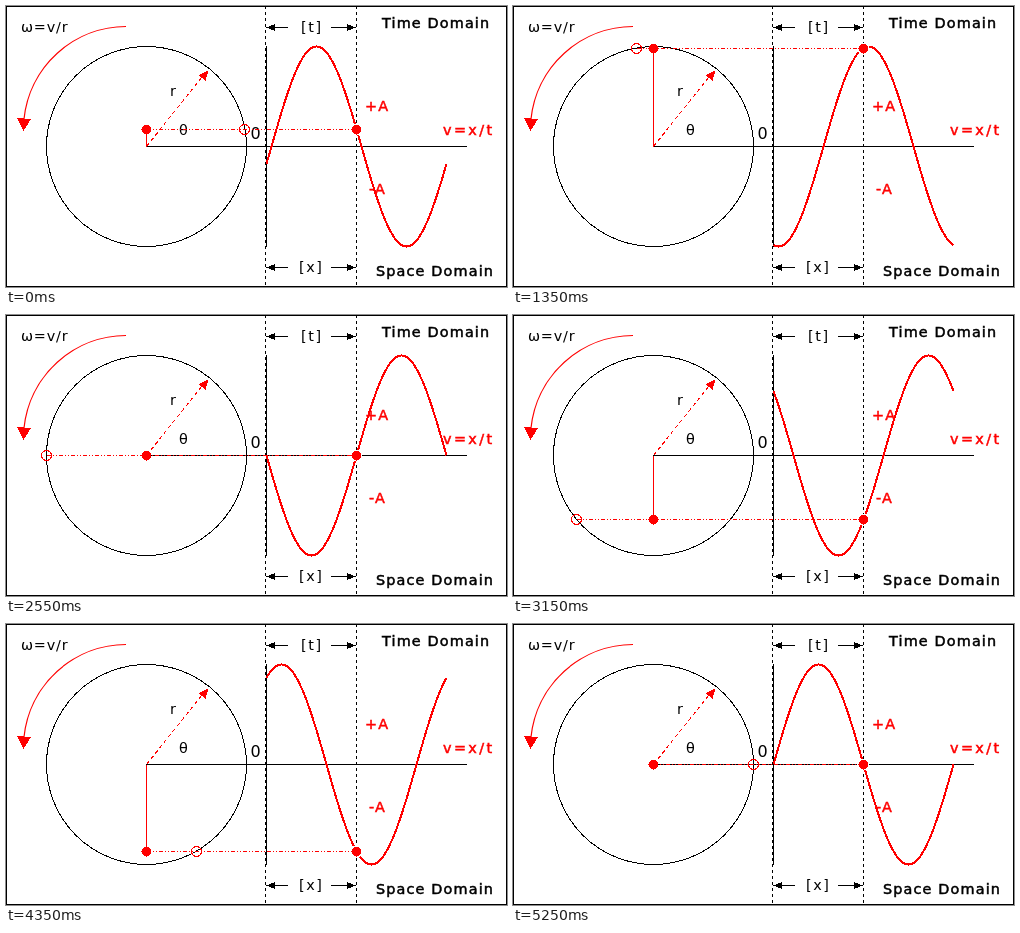
These frames come from a looping animation (501 by 281 pixels, 5.4 s). An HTML page:

```html
<!DOCTYPE html>
<html lang="en">
<head>
<meta charset="utf-8">
<title>Rotation and sine wave</title>
<style>
html, body { margin: 0; width: 100%; height: 100%; overflow: hidden; background: #fff; }
svg { display: block; width: 501px; height: 281px; shape-rendering: crispEdges; fill: none; stroke: #000; }
text { font: 14.4px "DejaVu Sans", Verdana, sans-serif; fill: #000; stroke: none; }
.red { stroke: #f00; }
text.red { fill: #f00; stroke: none; }
text.heavy { stroke: #000; stroke-width: .5; letter-spacing: 1.15px; }
text.red.heavy { stroke: #f00; }
.head { fill: #000; stroke: none; }
.red.head { fill: #f00; stroke: none; }
.dot { fill: #f00; stroke: #f00; }
.halo { fill: #fff; stroke: none; }
.smooth { shape-rendering: geometricPrecision; stroke-width: 1.2; }
</style>
</head>
<body>
<svg viewBox="0 0 501 281">
  <rect x=".5" y=".5" width="500" height="280"/>
  <circle cx="140.5" cy="140.5" r="100"/>
  <path d="M140 140.5H461M260.5 40V241"/>
  <path d="M259.5 0V281M350.5 0V281" stroke-dasharray="3 3"/>

  <g id="span">
    <path d="M268 21.5H282M325 21.5H341"/>
    <path class="head" d="M260 21.5l9-3.5v7zM350 21.5l-9-3.5v7z"/>
  </g>
  <use href="#span" y="240"/>

  <path class="red smooth" d="M120 20.5A103 103 0 0 0 18 113"/>
  <path class="red head" d="M17.5 125L11 112l14 1z"/>
  <path class="red" d="M140.5 140.5L196 71" stroke-dasharray="4 3"/>
  <path class="red head" d="M202.5 64l-3 11-7-6z"/>

  <text x="15" y="26" letter-spacing=".8">ω=v/r</text>
  <text x="164" y="90">r</text>
  <text x="173" y="129">θ</text>
  <text x="244.5" y="133" style="font-size:16px">0</text>
  <text x="295" y="26" letter-spacing="1.6">[t]</text>
  <text x="293" y="266" letter-spacing="1.6">[x]</text>
  <text class="heavy" x="376" y="22">Time Domain</text>
  <text class="heavy" x="370" y="270">Space Domain</text>
  <text class="red heavy" x="359" y="105">+A</text>
  <text class="red heavy" x="363" y="188">-A</text>
  <text class="red heavy" x="437" y="129" style="letter-spacing:2.4px">v=x/t</text>

  <path id="wave" class="red" stroke-width="2"/>
  <circle id="halo" class="halo" cx="350.5" r="6"/>
  <path id="link" class="red" stroke-dasharray="4 2 1 2 1 2"/>
  <path id="height" class="red"/>
  <circle id="rim" class="red" r="5"/>
  <circle id="axisDot" class="dot" cx="140.5" r="4.5"/>
  <circle id="waveDot" class="dot" cx="350.5" r="4.5"/>
</svg>
<script>
const STEP = 150, STEPS = 36, R = 100, MID = 140.5;
const el = id => document.getElementById(id);
const set = (id, attrs) => {
  for (const key in attrs) el(id).setAttribute(key, attrs[key]);
};
const rad = deg => deg * Math.PI / 180;

function wavePath(angle) {
  const points = [];
  for (let x = 0; x <= 180; x++) {
    points.push(`${260.5 + x} ${(MID - R * Math.sin(rad(2 * x - angle))).toFixed(2)}`);
  }
  return 'M' + points.join('L');
}

function draw(step) {
  const angle = 10 * (step + 1);
  const x = MID + Math.round(R * Math.cos(rad(angle)));
  const y = MID - Math.round(R * Math.sin(rad(angle)));
  set('wave', { d: wavePath(angle) });
  set('link', { d: `M${Math.min(x, MID)} ${y}H350` });
  set('height', { d: `M${MID} ${MID}V${y}` });
  set('rim', { cx: x, cy: y });
  for (const id of ['halo', 'axisDot', 'waveDot']) set(id, { cy: y });
}

const start = performance.now();
let shown = -1;
function tick() {
  const step = Math.floor((performance.now() - start) / STEP) % STEPS;
  if (step !== shown) draw(shown = step);
  requestAnimationFrame(tick);
}
tick();
</script>
</body>
</html>
```
